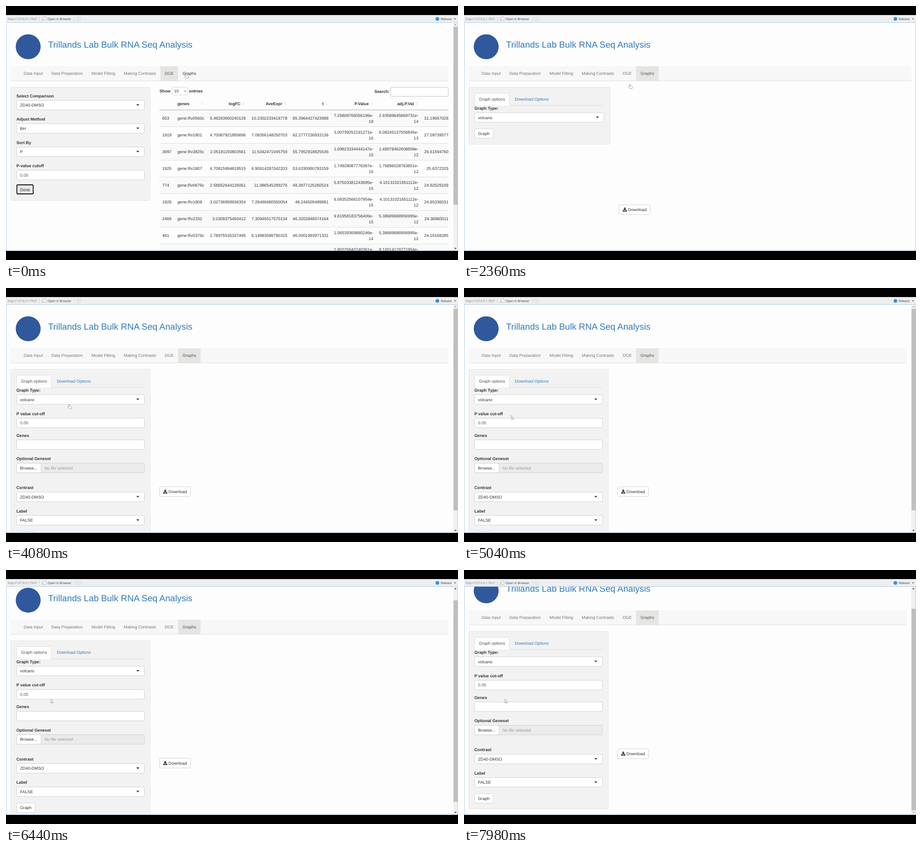
An HTML page that plays this animation: 998 by 561 pixels, repeating every 8000 ms.

```html
<!DOCTYPE html>
<html lang="en">
<head>
<meta charset="utf-8">
<title>RNA Seq Analysis</title>
<style>
  html, body { margin: 0; width: 100%; height: 100%; overflow: hidden; background: #000; }
  svg { display: block; width: 100%; height: 100%; }
  text { font: 9.17px "Liberation Sans", Arial, sans-serif; fill: #333; text-rendering: geometricPrecision; white-space: pre; }
  .bold { font-weight: bold; }
  .title { font-size: 19.62px; fill: #337ab7; }
  .tab { fill: #777; }
  .active { fill: #555; }
  .link { fill: #337ab7; }
  .field { fill: #555; }
  .hint { fill: #999; }
  .bar { font: 6.7px "Open Sans", sans-serif; }
  .url { fill: #777; }
</style>
</head>
<body>
<svg id="stage" viewBox="0 0 998 561"></svg>
<script>
const WELL = '#f2f2f2', PAPER = '#fdfdfd', LINE = '#ccc';

// Text is placed by its vertical middle.
const text = (x, y, s, cls = '', anchor = 'start') =>
  `<text x="${x}" y="${y + 3.2}" class="${cls}" text-anchor="${anchor}">${s}</text>`;
const fill = (x0, y0, x1, y1, color) =>
  `<rect x="${x0}" y="${y0}" width="${x1 - x0}" height="${y1 - y0}" fill="${color}"/>`;
const box = (x0, y0, x1, y1, color = '#fff', stroke = LINE, r = 2.5) =>
  `<rect x="${x0 + .5}" y="${y0 + .5}" width="${x1 - x0 - 1}" height="${y1 - y0 - 1}" rx="${r}" fill="${color}" stroke="${stroke}" stroke-width=".9"/>`;
const path = (d, color, extra = '') => `<path d="${d}" fill="${color}" ${extra}/>`;
const caret = (x, y, w = 3.3, h = 3.6, color = '#333') =>
  path(`M${x - w} ${y - h / 2}h${2 * w}l${-w} ${h}z`, color);

const label = (y, s) => text(23, y, s, 'bold');
const input = (y, s, right) => box(23, y - 11, right, y + 11) + text(31, y, s, 'field');
const select = (y, s, right) =>
  box(23, y - 11, right, y + 11) + text(31, y, s) + caret(right - 15, y - .3);
const button = (x0, x1, y, s) => box(x0, y - 11, x1, y + 11) + text(x0 + 8, y, s);

function header(active, right) {
  const tabs = [['Data Input', 39], ['Data Preparation', 100], ['Model Fitting', 188.7],
    ['Making Contrasts', 260], ['DGE', 350.5], ['Graphs', 389.7]];
  const [from, to] = active === 'DGE' ? [341, 380] : [380, 429.5];
  return '<circle cx="49" cy="90" r="27.5" fill="#30589c"/>' +
    text(93, 89.1, 'Trillands Lab Bulk RNA Seq Analysis', 'title') +
    fill(10, 133, right, 165, '#f7f7f7') + fill(10, 165, right, 166, '#dedede') +
    fill(from, 133, to, 165, '#e5e5e3') +
    tabs.map(([s, x]) => text(x, 149, s,
      s === active ? 'tab active' : s === 'Graphs' ? '' : 'tab')).join('');
}

const well = (right, bottom) => box(10, 179, right, bottom, WELL, '#e2e2e2');

function table() {
  const heads = [['logFC', 517.7], ['AveExpr', 610], ['t', 701.3], ['P.Value', 801], ['adj.P.Val', 900.5]];
  const rows = `653 Rv0560c 5.49263900240128 10.2302233419778 85.3964427423988 7.25808766056196e-18 2.93589645869731e-14 31.19567028
1919 Rv1801 4.70087921895696 7.09356148250703 62.2777236933136 3.00739252191271e-16 6.08245137556845e-13 27.09739577
3997 Rv3825c 2.05181150803561 11.5342471045759 55.7952918825536 1.09823334444147e-15 1.48078462608858e-12 26.61594760
1925 Rv1807 4.70815994819515 6.95914297042203 53.6330950793159 1.74928087776367e-15 1.76896028763851e-12 25.6372325
774 Rv0676c 2.58652644126061 11.086545299276 48.3877125260524 5.87503381243895e-15 4.10131021651112e-12 24.92529109
1926 Rv1808 3.02736958936354 7.28496680550054 48.244509499881 6.08352566107954e-15 4.10131021651112e-12 24.85336031
2469 Rv2332 3.0308375450412 7.30946517570134 46.3202846574164 9.81958183756406e-15 5.38689688956995e-12 24.38960011
461 Rv0376c 2.78975535337495 6.14983598790325 46.0001993971331 1.06539369880246e-14 5.38689688956995e-12 24.16168285`
    .split('\n').map(r => r.split(' '));
  const ends = [529.3, 621, 712];
  const split = (x, y, s) => {
    const [mantissa, exponent] = s.split('e-');
    return text(x, y - 6.7, mantissa + 'e-', '', 'end') + text(x, y + 6.3, exponent, '', 'end');
  };

  let out = text(339, 188, 'Show', 'bold') + box(366, 179, 402, 197) + text(371, 188, '10') +
    path('M393 186.8l2.3 2.3l2.3 -2.3', 'none', 'stroke="#444"') + text(404.3, 188, 'entries', 'bold') +
    text(847, 189, 'Search:', 'bold', 'end') + box(849, 179, 977, 200, '#fff', '#bbb') +
    text(378.5, 216, 'genes', 'bold');
  for (const [s, x] of heads) out += text(x, 216, s, 'bold', 'end');
  for (const x of [434, 525, 617, 708, 808, 907])
    out += caret(x, 217.7, 1.8, 2.4, '#ddd') + caret(x, 213.7, 1.8, -2.4, '#ddd');

  for (let i = 0; i < 9; i++)
    out += fill(339, 229 + 37 * i, 977, 266 + 37 * i, i % 2 ? PAPER : '#f9f9f9') +
      fill(339, 229 + 37 * i, 977, 230 + 37 * i, i ? '#ddd' : '#aaa');
  rows.forEach(([id, gene, a, b, c, p, adj, last], i) => {
    const y = 248 + 37 * i;
    out += text(345, y, id) + text(378.5, y, 'gene:' + gene) +
      [a, b, c].map((s, k) => text(ends[k], y, s, '', 'end')).join('') +
      split(811, y, p) + split(910.5, y, adj) + text(976.8, y, last, '', 'end');
  });
  return out + text(811, 537.3, '1.80225640740361e-', '', 'end') +
    text(910.5, 537.3, '8.10014129771954e-', '', 'end');
}

function dgePage() {
  return header('DGE', 977) + well(319, 430) +
    label(198.5, 'Select Comparison') + select(219, 'ZD40-DMSO', 306) +
    label(250, 'Adjust Method') + select(270.5, 'BH', 306) +
    label(301.3, 'Sort By') + select(322, 'P', 306) +
    label(353, 'P-value cutoff') + input(373.5, '0.05', 306) +
    button(23, 61, 405.3, 'Done') +
    '<g id="focus"><rect x="24" y="395" width="36" height="20" rx="2" fill="#e6e6e6" stroke="#111" stroke-width="1.8"/>' +
    text(31, 405.3, 'Done') + '</g>' + table();
}

function graphPage(full) {
  const right = full ? 306 : 309.5, x = full ? 338.5 : 342;
  let out = header('Graphs', full ? 977 : 988) + well(full ? 319 : 323, full ? 572 : 306) +
    fill(23, 219, right, 220, '#ddd') +
    path('M23.5 220V194.5q0 -2 2 -2H98q2 0 2 2V220', PAPER, 'stroke="#ddd" stroke-width=".9"') +
    text(33, 205.5, 'Graph options', 'active') + text(112.3, 205.5, 'Download Options', 'link') +
    label(226, 'Graph Type:') + select(246.3, 'volcano', right);
  if (full) out +=
    label(277.3, 'P value cut-off') + input(298, '0.05', right) +
    label(325.3, 'Genes') + input(346, '', right) +
    label(377, 'Optional Geneset') + box(23, 386.5, right, 408.5, '#ebebeb') +
    box(23, 386.5, 78, 408.5) + text(31, 397.5, 'Browse...') + text(85, 397.5, 'No file selected', 'hint') +
    label(441, 'Contrast') + select(461.5, 'ZD40-DMSO', right) +
    label(492.3, 'Label') + select(513, 'FALSE', right);
  return out + button(23, 65, full ? 548.5 : 281.6, 'Graph') +
    box(x, 438.5, x + 69.5, 461) + text(x + 20.3, 449.8, 'Download') +
    path(`M${x + 11.8} 445h2.6v3h2.4l-3.7 3.8l-3.7 -3.8h2.4zM${x + 8.5} 451h2.4l2.2 2l2.2 -2h2.4v3h-9.2z`, '#333');
}

const toolbar = fill(0, 20, 998, 36, '#eceef0') + text(3.7, 27.7, 'http://127.0.0.1:7627', 'bar url') +
  fill(73, 24, 74, 33, '#d5d5d5') + fill(151, 24, 152, 33, '#d5d5d5') +
  box(81, 24, 89, 32, '#fff', '#aaa', 1) + path('M79 32l3.5 -3.5', 'none', 'stroke="#888"') +
  text(92, 27.9, 'Open in Browser', 'bar') +
  box(156, 24, 165, 33, '#f8f8f8', '#c8d0d4', 2) +
  '<circle cx="160.5" cy="28.5" r="2" fill="none" stroke="#b5c5cc" stroke-width=".8"/>' +
  '<circle cx="952.5" cy="28.5" r="4" fill="#3c8fc4"/>' +
  text(960, 27.9, 'Release', 'bar') + caret(991.3, 28.7, 2, 2.2);

const scrollbar = '<g id="scrollbar">' + fill(987.5, 37, 997, 540, '#f1f1f1') +
  '<rect id="thumb" x="988" y="46" width="9.3" fill="#bfbfbf"/>' +
  '<path id="up" d="M989.8 42.5h5l-2.5 -3z"/><path id="down" d="M989.8 534.3h5l-2.5 3z"/></g>';

const pointer = 'stroke="#777" stroke-width=".7" stroke-linejoin="round"';
const cursors =
  '<g id="hand">' + path('M0 .8q.9 -1.2 1.8 0v3l4 .9q1.2 .4 1 1.8l-.7 3.5h-4.6l-3.3 -4q.4 -1 1.8 .2z', '#fff', pointer) + '</g>' +
  '<g id="arrow">' + path('M0 0v8l1.9 -1.7l1.4 2.9l1.2 -.6l-1.3 -2.8h2.5z', '#fff', pointer) + '</g>';

document.getElementById('stage').innerHTML =
  fill(0, 0, 998, 561, '#000') + fill(0, 36, 998, 541, PAPER) +
  '<clipPath id="view"><rect y="36" width="987.5" height="505"/></clipPath><g clip-path="url(#view)">' +
  `<g id="dge">${dgePage()}</g><g id="short">${graphPage(false)}</g><g id="full">${graphPage(true)}</g></g>` +
  scrollbar + box(0, 36, 998, 541, 'none', '#a9c6e4', 0) + toolbar + cursors;

const $ = id => document.getElementById(id);
const show = (id, on) => $(id).setAttribute('display', on ? 'inline' : 'none');
const smooth = u => { u = Math.min(1, Math.max(0, u)); return u * u * (3 - 2 * u); };

const LOOP = 8000, STEP = 20, BLUR = 1340, SWITCH = 1520, EXPAND = 2560;
const SCROLL_START = 6362, SCROLL_TIME = 150, SCROLL_END = 44;
const route = [[0, 396, 149.5], [1560, 396, 149.5], [2320, 365, 172.5], [2440, 365, 172.5], [3300, 138, 257],
  [4500, 138, 257], [5200, 99, 285.5], [6700, 99, 285.5], [7300, 90.5, 285.5], [LOOP, 90.5, 285.5]];

function cursorAt(t) {
  const i = route.findIndex(p => p[0] > t);
  const [t0, x0, y0] = route[i - 1], [t1, x1, y1] = route[i];
  const u = smooth((t - t0) / (t1 - t0));
  return [x0 + (x1 - x0) * u, y0 + (y1 - y0) * u];
}

function draw(now) {
  const t = Math.floor(now % LOOP / STEP) * STEP;
  const page = t < SWITCH ? 'dge' : t < EXPAND ? 'short' : 'full';
  for (const id of ['dge', 'short', 'full']) show(id, id === page);
  show('focus', page === 'dge' && t < BLUR);

  const scroll = SCROLL_END * smooth((t - SCROLL_START) / SCROLL_TIME);
  $('full').setAttribute('transform', `translate(0 ${-scroll})`);
  show('scrollbar', page !== 'short');
  $('thumb').setAttribute('height', page === 'dge' ? 393 : 445);
  $('thumb').setAttribute('y', 46 + scroll * .9);
  $('up').setAttribute('fill', scroll > 0 ? '#444' : '#a5a5a5');
  $('down').setAttribute('fill', scroll < SCROLL_END ? '#444' : '#a5a5a5');

  const [x, y] = cursorAt(t);
  const hand = t < 2500 || (t > 3050 && t < 4700);
  show('hand', hand);
  show('arrow', !hand);
  $(hand ? 'hand' : 'arrow').setAttribute('transform', `translate(${x} ${y})`);
  requestAnimationFrame(() => draw(performance.now() - start));
}
const start = performance.now();
draw(0);
</script>
</body>
</html>
```
